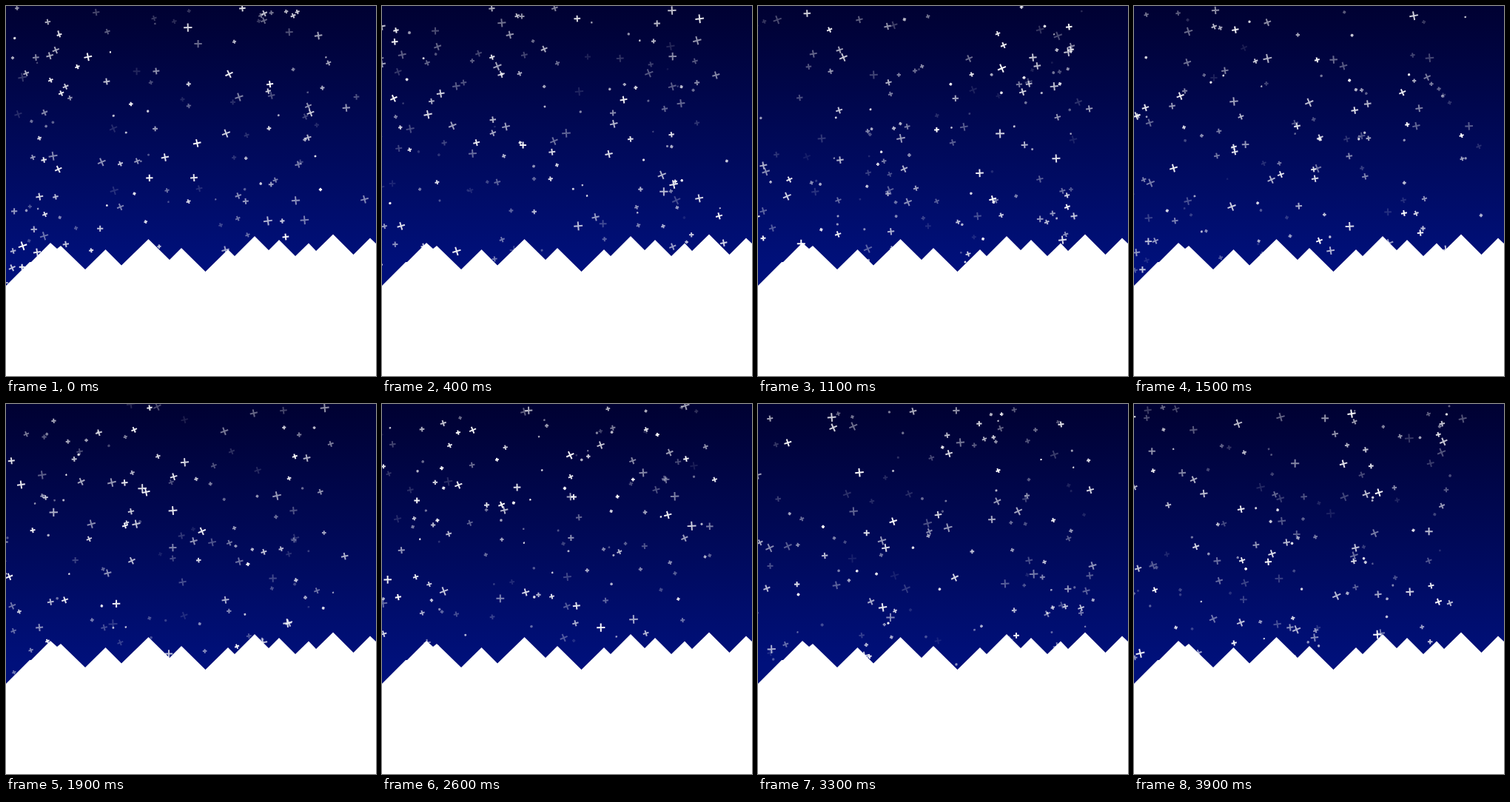
An HTML page that plays this animation: 500 by 500 pixels, repeating every 4 s.

```html
<!DOCTYPE html>
<html lang="en">
<head>
<meta charset="utf-8">
<title>Twinkling night sky</title>
<style>
  html, body { margin: 0; width: 100%; height: 100%; overflow: hidden; background: #fff; }
  svg { display: block; width: 100vw; height: 100vh; }
</style>
</head>
<body>
<svg viewBox="0 0 500 500" preserveAspectRatio="none">
  <defs>
    <linearGradient id="night" gradientUnits="userSpaceOnUse" x1="0" y1="0" x2="0" y2="350">
      <stop offset="0" stop-color="#000132"/>
      <stop offset="1" stop-color="#00107b"/>
    </linearGradient>
  </defs>
  <rect width="500" height="500" fill="url(#night)"/>
  <g id="stars" stroke="#fff" stroke-width="2" fill="none"></g>
  <path fill="#fff" d="M0 378 32 346H34L60 320 69 328 74 324 107 356 134.500 329 156 350.500 192.500 315 221 343 237 327 269.500 359 300 329 309 338 336 311 355 330 369 316 391 338 409 320.500 419 331 442 308.500 469.500 336 492 313.500 500 321V500H0Z"/>
</svg>
<script>
const COUNT = 200, LOOP = 4000, STEP = 100;
const group = document.getElementById('stars');
const stars = Array.from({ length: COUNT }, () =>
  group.appendChild(document.createElementNS(group.namespaceURI, 'path')));

function seeded(seed) {
  let a = Math.imul(seed + 1, 0x9e3779b1);
  return () => {
    a = (a + 0x6d2b79f5) | 0;
    let t = Math.imul(a ^ (a >>> 15), 1 | a);
    t = (t + Math.imul(t ^ (t >>> 7), 61 | t)) ^ t;
    return ((t ^ (t >>> 14)) >>> 0) / 4294967296;
  };
}

// Every step scatters the stars anew; they thin out towards the right edge,
// which they reach only lower in the sky.
function scatter(step) {
  const rand = seeded(step);
  for (const star of stars) {
    const y = rand() * 390;
    const spread = 50 * Math.min(1, y / 200);
    const x = -50 + 500 * rand() + spread * (2 * rand() - 1);
    const arm = 1 + rand() * 5;
    const tilt = -25 * rand();
    star.setAttribute('d', `M${-arm} 0H${arm}M0 ${-arm}V${arm}`);
    star.setAttribute('transform', `translate(${x} ${y}) rotate(${tilt})`);
    star.setAttribute('opacity', 0.08 + 0.92 * rand() ** 0.85);
  }
}

let shown = -1;
function draw(ms) {
  const step = Math.floor((ms % LOOP) / STEP);
  if (step !== shown) scatter(shown = step);
}

const start = performance.now();
function tick() {
  draw(performance.now() - start);
  requestAnimationFrame(tick);
}
tick();
</script>
</body>
</html>
```
